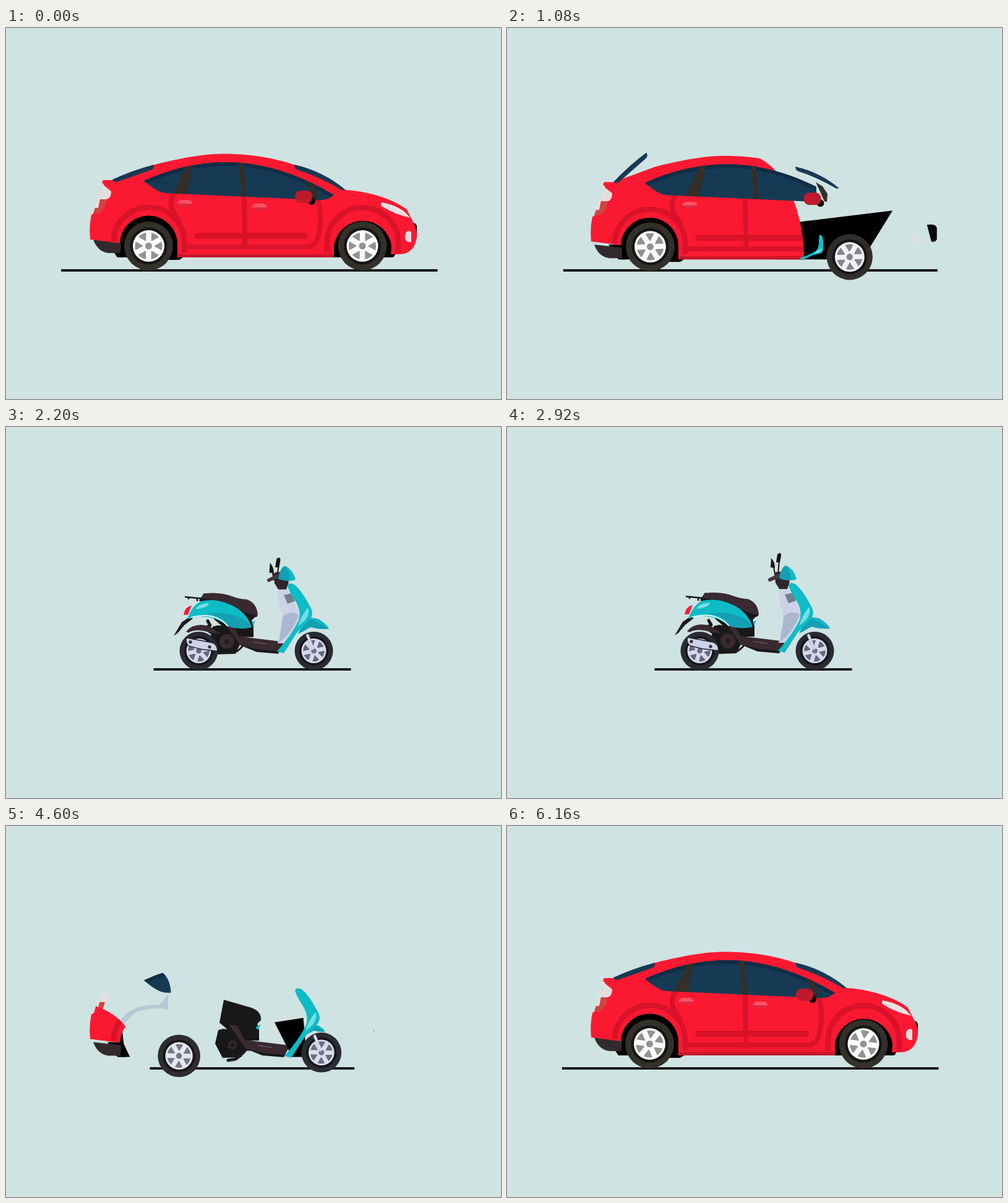
Animation, 800 px wide and 600 px high, one loop 6.2 s. Source, as an HTML page with a canvas:

```html
<!DOCTYPE html>
<html>
<head>
<meta charset="utf-8">
<style>
html, body { margin: 0; height: 100%; overflow: hidden; background: #cfe3e2; }
canvas { display: block; }
</style>
</head>
<body>
<canvas id="stage" width="800" height="600"></canvas>
<script>
const g = document.getElementById('stage').getContext('2d');
const RED = '#fb1931', SEAM = '#d9122a', NAVY = '#173a54', BROWN = '#392a31',
      INK = '#181818', CYAN = '#0dbcc6', TEAL = '#149fb3', SILVER = '#cdd2e6';
const TAU = Math.PI * 2;
let u = 0; // position on the car-to-scooter timeline, in ms

const clamp = v => Math.max(0, Math.min(1, v));
const lerp = (a, b, f) => a + (b - a) * f;
const span = (a, b) => clamp((u - a) / (b - a));
const decay = k => Math.exp((1080 - u) / k);
const quad = p => p < .5 ? 2 * p * p : 1 - 2 * (1 - p) ** 2;
const cubic = p => p < .5 ? 4 * p ** 3 : 1 - 4 * (1 - p) ** 3;
const back = p => 1 + 2.2 * (p - 1) ** 3 + 1.2 * (p - 1) ** 2;
const mix = (a, b, f) => `rgb(${a.map((v, i) => Math.round(lerp(v, b[i], f)))})`;

function fill(d, color) {
  g.fillStyle = color;
  g.fill(new Path2D(d));
}

function line(d, width, color, cap = 'round') {
  g.lineWidth = width;
  g.lineCap = cap;
  g.lineJoin = 'round';
  g.strokeStyle = color;
  g.stroke(new Path2D(d));
}

function disc(x, y, r, color) {
  g.fillStyle = color;
  g.beginPath();
  g.arc(x, y, r, 0, TAU);
  g.fill();
}

function group(paint) {
  g.save();
  paint();
  g.restore();
}

// Paints around a pivot with an offset, scale and turn in degrees
function part(x, y, dx, dy, scale, turn, paint) {
  if (scale <= .001) return;
  group(() => {
    g.translate(x + dx, y + dy);
    g.rotate(turn * Math.PI / 180);
    g.scale(scale, scale);
    g.translate(-x, -y);
    paint();
  });
}

// A car part drifts off its seat, then shrinks away
function loosen(x, y, from, to, dx, turn, paint) {
  const p = span(from, to);
  part(x, y, dx * p, 0, 1 - span(to, to + 250), turn * p, paint);
}

// A scooter part grows into place
function pop(from, x, y, paint, dx = 0, dy = 0) {
  const p = span(from, from + 300);
  if (p) part(x, y, dx * (1 - p), dy * (1 - p), back(p), 0, paint);
}

// Keeps what lies left of a front with a rounded upper corner
function wipe(edge, rx, base, ry) {
  const top = base - ry;
  g.clip(new Path2D(`M-99 ${top}H${edge - rx}A${rx} ${ry} 0 0 1 ${edge} ${base}V400H-99Z`));
}

// The front rushes left, slows near its stop, then leaves
const front = (stop, reach) => stop + reach * decay(150) - 65 * span(1620, 1850);

function road() {
  const f = cubic(span(1000, 1560));
  line(`M${lerp(89, 238.5, f)} 392H${lerp(697.5, 557.5, f)}`, 4, INK, 'butt');
}

function wheel(x0, x1, f, time, fork) {
  const dip = f * (1 - f) * (90 - 55 * f), size = lerp(1, .785, f);
  const pale = mix([252, 252, 252], [214, 217, 238], f);
  const gray = mix([146, 146, 146], [100, 104, 120], f);
  part(0, 0, lerp(x0, x1, f), lerp(352.5, 362, f) + dip, size, 0, () => {
    disc(0, 0, 39.5, mix([51, 48, 41], [42, 42, 53], f));
    disc(0, 0, 30, '#151515');
    disc(0, 0, 25.5, pale);
    disc(0, 0, 22, gray);
    group(() => {
      g.rotate(time / 620 * TAU);
      for (let i = 0; i < 6; i++) {
        line('M0 0V-23', 8.5, pale, 'butt');
        g.rotate(TAU / 6);
      }
    });
    disc(0, 0, 9.5, pale);
    disc(0, 0, 5.5, gray);
    if (fork && f > .6) {
      g.globalAlpha = clamp((f - .6) * 5);
      line('M0 0L-13 -32', 6, '#b4bbd2');
      line('M0 0L-13 -32', 3, '#e0e3f3');
      disc(0, 0, 3.5, '#6f778e');
    }
  });
}

function windows() {
  group(() => {
    wipe(front(243, 259), 20, 270, 33 + 40 * decay(150));
    const roof = 'M223 247Q290 217 355 217C420 217 480 240 530 270';
    const glass = new Path2D(roof + 'L521 276Q514 279 500 278L258 267Q244 266 223 247Z');
    g.fillStyle = NAVY;
    g.fill(glass);
    g.clip(glass);
    line(roof, 12, '#102d45', 'butt');
    g.translate(18 * span(640, 1080), 0);
    fill('M294 218H303L292 273H268ZM376 214H384L389 280H381Z', '#332f2a');
  });
  loosen(496, 263, 640, 1080, 15, 0, () => fill('M484 246L495 253L503 265L502 278L498 277Z', '#332f2a'));
}

function handle(x, y, gone) {
  part(0, 0, x + 6.5 * span(420, 600), y, 1 - span(gone - 150, gone), 0, () => {
    fill('M-12 0Q-11 -6 -5 -6H6Q12 -5 12 0Z', '#fb5268');
    fill('M-12 0H12Q10 5 5 5H-5Q-10 5 -12 0Z', '#df2840');
  });
}

function underside() {
  const edge = front(183, 299);
  g.clip(new Path2D(`M-99 0H${edge - 60}L${edge - 20} 350L${edge - 10} 371V400H-99Z`));
  for (const x of [230.5, 576]) fill(`M${x - 48} 371V352A48 49 0 0 1 ${x + 48} 352V371Z`, '#000');
  fill('M164 347H194V371H180ZM262 360V375H280L286 371ZM510 360V371H626L632 362Z', '#000');
}

function body() {
  wipe(front(183, 299), 100, 370, 78 + 92 * decay(150));
  fill('M157 246H172L240 221C300 206 330 203.5 352 203.5C400 203.5 440 212 468 222L549 262' +
    'C590 264 632 280 648 294L656 310Q664 322 664 335C663 355 652 366 636 366H622L623 352' +
    'A47 47 0 0 0 530 352V370Q529 371 527 371H277V352A46.5 46.5 0 0 0 184 348L136 342' +
    'Q134 320 138 302L142 300L147 283L159 262Q160 253 155 250Z', RED);
  line('M174 345A57 56 0 0 1 288 347V363', 9, SEAM, 'butt');
  line('M519 363V347A57 56 0 0 1 634 347V364', 9, SEAM, 'butt');
  line('M273 266Q262 282 270 296L281 314', 8, SEAM, 'butt');
  line('M385 274L386 350M502 272Q510 295 508 315Q505 354 488 354H296', 8, SEAM);
  line('M309 336H483', 10, SEAM);
  fill('M278 366H529Q529 371 525 371H282Q278 371 278 366Z', '#c5162c');
  handle(289, 284, 1500);
  handle(409.5, 290, 1060);
  loosen(630, 294, 500, 750, 0, 0, () =>
    fill('M607 282Q640 288 653 307Q625 300 607 288Q605 283 607 282Z', '#e9e1e1'));
}

function engineBay() {
  const e = Math.min(1, decay(200));
  part(468, 340, 0, 0, 1 - span(1620, 1850), 0, () =>
    fill(`M434 315L${452 + 172 * e} ${311 - 19 * e}L${468 + 107 * e} 371H${468 - 34 * e}Z`, '#000'));
}

function car(bob) {
  const sag = span(700, 1060);
  g.translate(0, bob + 3.5 * sag);
  engineBay();
  const away = span(1080, 1460);
  part(651, 331, 5 + 31 * span(620, 1080) - 98 * away, -2, 1 - away, 0, () =>
    fill('M643 317Q657 315 659 322V340Q657 346 650 344Z', '#080808'));
  group(underside);
  part(160, 350, 0, 5 * sag, 1 - span(1700, 1900), 0, () => {
    wipe(front(183, 299) - 18, 8, 380, 60);
    fill('M141 342L186 347L185 364H166Q148 362 141 342Z', '#322b2d');
  });
  const lampSize = 1 - span(1080, 1850) ** 2;
  part(148, 302, 0, 0, lampSize, 0, () => {
    fill('M155 252L170 264Q170 275 163 277H152L149 293L143 292Q148 272 158 262Z', '#e6dede');
    fill('M152 277H163Q161 291 152 299L141 300L144 291H149Z', '#cf4440');
  });
  group(body);
  // The lamp sits on the panel until the wipe reaches it
  if (u < 1380 || u > 1500) part(148, 302, 0, 0, lampSize, 0, () => {
    fill('M155 252L170 264Q170 275 163 277H152L149 293L143 292Q148 272 158 262Z', '#e6dede');
    fill('M152 277H163Q161 291 152 299L141 300L144 291H149Z', '#cf4440');
  });
  windows();
  loosen(173, 247, 640, 1080, 1, -22, () =>
    fill('M172 245Q205 230 239 221Q240 226 236 229L179 249Q173 249 172 245Z', NAVY));
  part(466, 222, 0, 0, 1 - span(1045, 1295), -14 * Math.sin(Math.PI * span(480, 1045)), () =>
    fill('M466 221Q512 231 549 262L543 262Q505 240 470 229Q466 226 466 221Z', NAVY));
  loosen(650, 337, 700, 1020, 10, 0, () =>
    fill('M648 329Q654 327 655 330V346Q647 347 645 341V333Z', '#e6dcdc'));
  loosen(481, 273, 640, 1080, 12.5, 0, () => {
    disc(494, 280, 6, '#080808');
    fill('M476 263H487Q495 264 495 273Q495 283 486 283H476Q467 282 467 273Q467 264 476 263Z', '#bf1a2b');
  });
}

function trim() {
  const p = span(1650, 2050);
  g.globalAlpha = span(1250, 1400) * (1 - span(1950, 2050));
  if (u < 1580) fill('M246 293L289 237L262 274V298Z', '#b6c9d6');
  part(230, 300, 100 * p, 8 * p, 1 - .4 * p, 0, () =>
    fill('M170 346Q185 297 222 291Q250 286 262 295Q235 293 210 301Q192 314 180 342Z', '#b6c9d6'));
}

function scooterFrame() {
  part(380, 345, 0, 0, span(1090, 1350), 0, () => {
    fill('M343 273L388 286Q404 292 403 306L397 312L400 320V339H370L336 310Z', INK);
    fill('M334 322L342 320L366 322L380 347L371 366L341 367L329 344Z', INK);
    disc(357, 346, lerp(7, 12, span(1600, 1900)), BROWN);
    disc(357, 346, 4, '#221a1e');
    part(390, 352, 0, 0, 1 - .4 * span(1600, 1900), 0, () =>
      line('M350 371L362 369Q374 360 379 353H398', 5, '#211b1e'));
    fill('M372 340L447 352L440 366L405 363L378 352Z', INK);
    fill('M351 313L365 315L377 338L443 346L449 350L441 362L408 359L378 352Z', BROWN);
    line('M399 347L420 350', 1.5, '#66535e');
    fill('M394 318L403 312L399 322Z', CYAN);
  });
}

function scooterRear() {
  pop(1850, 285, 318, () => fill('M297 306L284 315L271 337L277 333L288 320L302 309Z', '#1b1a1c'), -60, 10);
  pop(1780, 327, 320, () => line('M326 313L330 320L325 323L330 331', 5, '#17171a'));
  pop(1750, 320, 325, () => fill('M291 330Q305 314 330 322L347 334L327 331Q308 325 295 332Z', BROWN));
  pop(1900, 316, 350, () => {
    const pipe = 'M292 341L334 349Q341 352 341 361L316 358L296 353Q291 349 292 341Z';
    line(pipe, 3, '#202027');
    fill(pipe, SILVER);
    disc(298, 347, 2.6, '#34343f');
    disc(329, 355, 2.6, '#34343f');
  }, -20, 35);
  pop(1700, 350, 300, () => {
    fill('M312 280L320 268L390 284Q406 292 406 306L396 308L400 325H372Z', '#17171a');
    fill('M294 307Q301 288 315 281Q342 276 362 286Q388 297 397 323Q380 328 360 322Q345 310 328 307Q310 304 294 310Z', CYAN);
    fill('M318 303Q345 300 362 322Q380 327 397 323Q388 310 374 306Q350 296 318 303Z', TEAL);
    fill('M306 294Q312 284 328 284Q326 292 306 294Z', '#78dfe4');
    line('M300 307Q338 298 358 321', 2, '#e1f5f7');
  });
  pop(1850, 293, 297, () => fill('M287 303Q289 290 300 288L294 303Z', '#f01d38'), -30);
  pop(1900, 304, 275, () => line('M289 274L320 277M309 277V281M295 274V278', 2.5, '#19171a', 'butt'));
  pop(1800, 360, 284, () => fill('M319 269Q345 265 368 274Q380 278 389 278Q406 284 407 304Q392 303 376 293Q350 278 316 277Z', BROWN));
}

function scooterFront() {
  pop(1750, 452, 335, () => {
    fill('M440 262H455Q470 286 475 305Q465 330 449 349H439Q446 320 446 300Q438 280 440 262Z', SILVER);
    fill('M448 305Q460 296 473 303Q464 330 441 348Z', '#abb7ce');
    fill('M449 271L462 268L467 281L455 285Z', '#71808f');
  });
  pop(2000, 434, 236, () => {
    line('M433 238L431 226M438 238L440 216', 2, '#151515');
    fill('M427 212Q433 218 433 228L426 227ZM437 206Q443 201 443 208L441 219H435Z', '#151515');
  }, 0, 25);
  pop(1900, 446, 248, () => {
    fill('M432 237Q438 231 446 236L457 250L453 262H440L434 252Z', '#30252a');
    line('M425 247L440 240', 6, '#46363e');
    fill('M440 245Q443 226 451 224Q463 229 468 246Q455 251 440 245Z', TEAL);
    fill('M451 224Q463 229 468 246L459 248Q459 234 451 224Z', CYAN);
  }, 0, 20);
  part(482, 323, 0, 0, span(1280, 1400) * (.62 + .38 * span(1600, 1900)), 0, () => {
    fill('M482 313Q490 305 505 310Q518 317 522 326Q508 327 492 323Q482 329 472 334Z', TEAL);
    fill('M490 309Q510 308 522 326Q508 316 490 309Z', CYAN);
  });
  const rise = span(1000, 1400), late = 1 - span(1700, 1950);
  part(444, 364, 24 * (1 - rise) + 3 * late, 2 * late, Math.sqrt(rise), 40 * (1 - rise), () => {
    fill('M455 256Q457 250 466 254Q478 264 490 287Q498 298 493 308L470 332L449 365L438 362' +
      'Q462 335 473 312Q478 296 466 278Q457 264 455 256Z', CYAN);
    fill('M488 291Q492 300 484 311L472 322Q476 306 488 291Z', '#74dde4');
  });
}

function draw(now) {
  const t = now % 6200;
  u = t < 3020 ? t : 6040 - t;
  const bob = -1.8 * Math.sin(Math.PI * t / 1240) ** 2;
  const apart = 1 - quad(span(1700, 2050));
  const scooter = paint => group(() => {
    g.translate(9 * apart, 8 * apart + (bob + 1.4) * (1 - apart));
    paint();
  });
  g.fillStyle = '#cfe3e2';
  g.fillRect(0, 0, 800, 600);
  road();
  group(trim);
  scooter(scooterFrame);
  group(() => car(bob));
  wheel(230.5, 311.5, cubic(span(949, 1859)), t, false);
  wheel(576, 497.5, quad(span(690, 1730)), t, true);
  scooter(scooterRear);
  scooter(scooterFront);
}

const start = performance.now();
function tick() {
  draw(performance.now() - start);
  requestAnimationFrame(tick);
}
tick();
</script>
</body>
</html>
```
